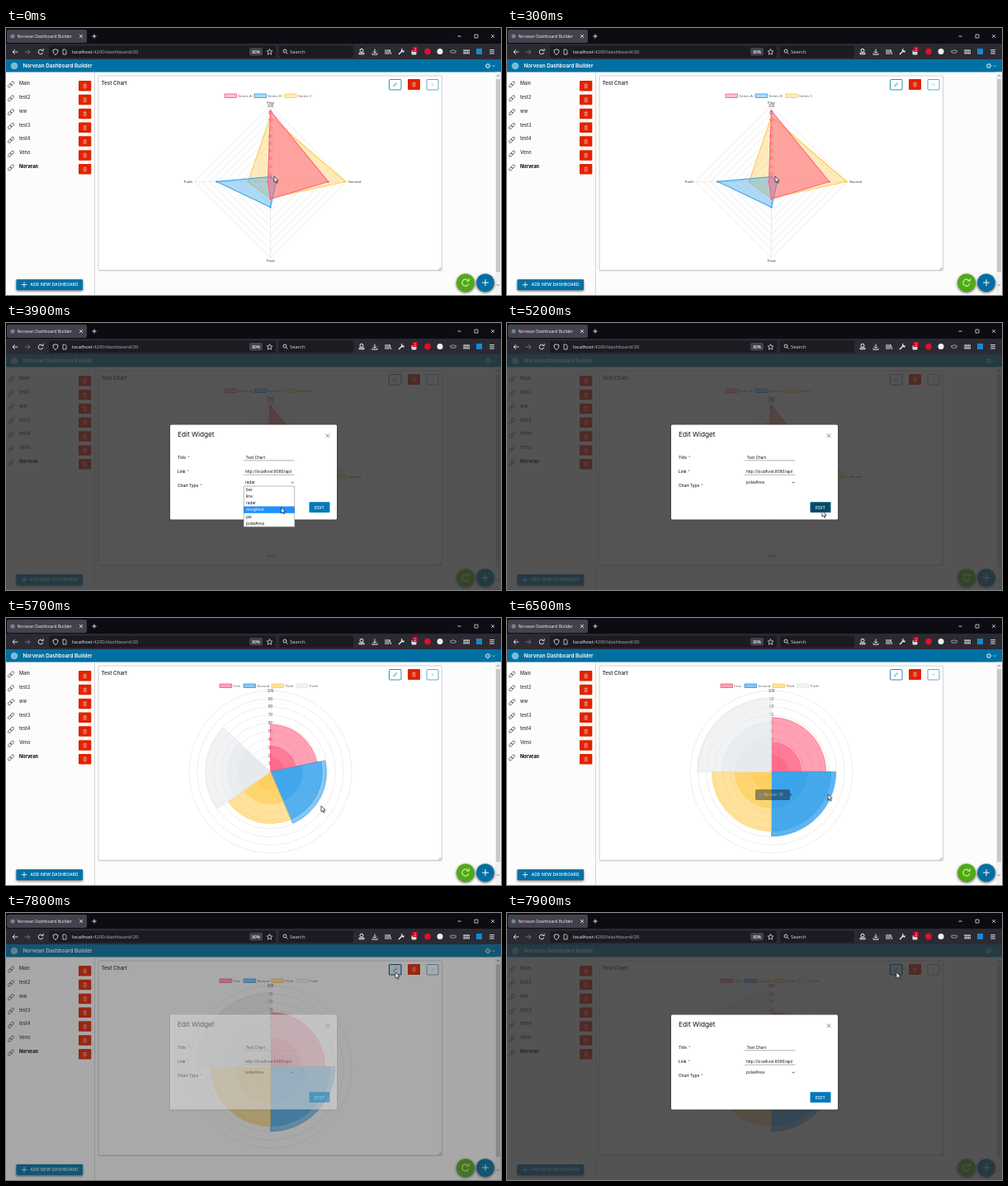
An HTML page with a canvas for the animation above (8000 ms loop, 600 by 324 pixels).

```html
<!DOCTYPE html>
<html lang="en">
<head>
<meta charset="utf-8">
<title>Dashboard</title>
<style>
  html, body { margin: 0; width: 100%; height: 100%; overflow: hidden; background: #fcfcfc; }
  canvas { display: block; width: 600px; height: 324px; }
</style>
</head>
<body>
<canvas id="stage"></canvas>
<script>
const W = 600, H = 324, LOOP = 8000, STEP = 100;
const canvas = document.getElementById('stage');
const ctx = canvas.getContext('2d');
const dpr = window.devicePixelRatio || 1;
canvas.width = W * dpr;
canvas.height = H * dpr;

const BLUE = '#0072a3', RED = '#e12200';
const PALETTE = ['255,99,132', '54,162,235', '255,206,86', '231,233,237'];
const AXES = ['First', 'Second', 'Third', 'Forth'];
const RADAR = [[86, 70, 21, 3], [6, 7, 31, 65], [79, 91, 20, 27]];
const POLAR = [[66, 78, 72, 90], [36, 72, 44, 60], [20, 44, 24, 44]];
const ITEMS = ['Main', 'test2', 'ww', 'test3', 'test4', 'Veno', 'Norvean'];
const CHART_TYPES = ['bar', 'line', 'radar', 'doughnut', 'pie', 'polarArea'];
const CURSOR = [
  [0, 325, 180], [2600, 325, 180], [2700, 316.5, 176], [2900, 336, 194],
  [3500, 336, 194], [4200, 332, 243], [4500, 332, 243], [5100, 382, 228],
  [6400, 382, 228], [6900, 450, 92], [7000, 450, 92], [7600, 472, 72], [8000, 472, 72]
];

const rgba = (i, a) => `rgba(${PALETTE[i]},${a})`;
const clamp = v => Math.max(0, Math.min(1, v));

function rect(x, y, w, h, fill, r = 0) {
  ctx.fillStyle = fill;
  ctx.beginPath();
  ctx.roundRect(x, y, w, h, r);
  ctx.fill();
}
function frame(x, y, w, h, color, width = 0.8, r = 0) {
  ctx.strokeStyle = color;
  ctx.lineWidth = width;
  ctx.beginPath();
  ctx.roundRect(x, y, w, h, r);
  ctx.stroke();
}
function disc(x, y, r, fill) {
  ctx.fillStyle = fill;
  ctx.beginPath();
  ctx.arc(x, y, r, 0, 7);
  ctx.fill();
}
function ring(x, y, r, color, width = 0.8, from = 0, to = Math.PI * 2) {
  ctx.strokeStyle = color;
  ctx.lineWidth = width;
  ctx.beginPath();
  ctx.arc(x, y, r, from, to);
  ctx.stroke();
}
function icon(x, y, path, color, width = 0.9, fill) {
  ctx.save();
  ctx.translate(x, y);
  const shape = new Path2D(path);
  if (fill) { ctx.fillStyle = fill; ctx.fill(shape); }
  ctx.strokeStyle = color;
  ctx.lineWidth = width;
  ctx.stroke(shape);
  ctx.restore();
}
function text(s, x, y, size, color, { weight = 400, align = 'left', family = 'Inter', gap = 0 } = {}) {
  ctx.font = `${weight} ${size}px ${family}, sans-serif`;
  ctx.textAlign = align;
  ctx.letterSpacing = gap + 'px';
  ctx.fillStyle = color;
  ctx.fillText(s, x, y);
}
function withShadow(color, blur, dy, draw) {
  ctx.save();
  ctx.shadowColor = color;
  ctx.shadowBlur = blur * dpr;
  ctx.shadowOffsetY = dy * dpr;
  draw();
  ctx.restore();
}
function clipped(x, y, w, h, draw) {
  ctx.save();
  ctx.beginPath();
  ctx.rect(x, y, w, h);
  ctx.clip();
  draw();
  ctx.restore();
}

const CROSS = 'M-2-2L2 2M2-2L-2 2';
const PLUS = 'M-2.5 0H2.5M0-2.5V2.5';
const CARET = 'M-1.5-.7L0 .8L1.5-.7';

function drawBrowser() {
  const ui = { family: 'Open Sans' }, light = '#f4f4f6';
  rect(0, 0, W, 20, '#0d0c12');
  rect(1, 2, 97, 16, '#42414d', 2);
  disc(8, 10, 2.6, '#6d8796');
  clipped(13, 3, 70, 14, () => text('Norvean Dashboard Builder', 13.5, 12, 5.1, light, ui));
  icon(91, 10, CROSS, light, 0.8);
  icon(107, 10, PLUS, light, 0.9);
  icon(549.5, 10, 'M-2 0H2', light, 0.8);
  frame(568, 8, 4, 4, light, 0.7);
  icon(590, 10, CROSS, light, 0.7);

  rect(0, 19, W, 19, '#2b2a33');
  icon(11, 29, 'M3.3 0H-3M-.2-2.8L-3 0L-.2 2.8', light, 0.9);
  icon(26, 29, 'M-3.3 0H3M.2-2.8L3 0L.2 2.8', '#7c7b83', 0.9);
  ring(42, 29, 2.8, light, 0.9, 0.2, 5.4);
  icon(44, 26.5, 'M1.2-1.5V1H-1.3', light, 0.8);
  rect(52, 21.5, 275, 14.5, '#1c1b22', 2);
  icon(60, 29, 'M0-3.3L3-2.1C3 1 1.6 2.6 0 3.5C-1.6 2.6-3 1-3-2.1Z', light, 0.8);
  icon(71, 29, 'M-2-3H.8L2-1.7V3H-2Z', light, 0.7);
  text('localhost', 80, 31.2, 5.9, '#fbfbfe', ui);
  const hostWidth = ctx.measureText('localhost').width;
  text(':4200/dashboard/20', 80 + hostWidth, 31.2, 5.9, '#b4b3ba', ui);
  rect(295, 24, 16, 9.5, '#42414d', 2);
  text('80%', 303, 30.8, 4.8, light, { ...ui, align: 'center', weight: 600 });
  icon(319.5, 29, 'M0-3.5L1-1.1L3.4-1L1.6.7L2.2 3.2L0 1.8L-2.2 3.2L-1.6.7L-3.4-1L-1-1.1Z', light, 0.7);
  rect(331, 21.5, 90, 14.5, '#1c1b22', 2);
  ring(338, 28, 2, light, 0.8);
  icon(339.5, 29.5, 'M0 0L2 2', light, 0.8);
  text('Search', 344, 31.2, 5.9, '#d9d9de', ui);

  ring(431, 27.3, 2, light, 1);
  icon(431, 30.5, 'M-3 1.3V-.3H3V1.3Z', light, 0.9);
  icon(447, 29, 'M0-3.5V1.5M-2-.5L0 1.6L2-.5M-3 1.5V3.2H3V1.5', light, 0.9);
  icon(463, 29, 'M-3-3V3M-1-3V3M1-3V3M1.8-3L3.8 3', light, 0.9);
  icon(479, 29, 'M-3 3L1-1M0-2.5L2.5 0L3.5-1.5M0-2.5L1.5-3.5', light, 1.3);
  rect(491.5, 27, 6, 5.5, '#d9d9de', 1);
  rect(492.5, 22.8, 6.5, 6.2, '#d70022', 1);
  text('2', 495.8, 27.5, 4.5, '#fff', { ...ui, align: 'center' });
  disc(511, 28.6, 3.8, '#e40d2c');
  disc(526, 28.6, 3.5, '#f1f1f1');
  icon(542, 28.8, 'M-3.5-1Q0-3 3.5-1Q3 2.5 1 1.3H-1Q-3 2.5-3.5-1Z', '#b4b3ba', 0.8);
  for (let i = 0; i < 8; i++) rect(554.5 + (i % 4) * 2, 26.2 + (i >> 2) * 3, 1.4, 2.2, '#e4e4e8');
  rect(570, 25, 7, 7, '#138bd1');
  icon(589, 28.8, 'M-2.8-2.2H2.8M-2.8 0H2.8M-2.8 2.2H2.8', light, 0.9);
}

function trash(x, y) {
  icon(x, y, 'M-2-1.7H2M-.7-1.7V-2.5H.7V-1.7M-1.5-1.7V2.5H1.5V-1.7M-.5-.4V1.5M.5-.4V1.5', 'rgba(255,255,255,.8)', 0.5);
}
function link(x, y) {
  ctx.save();
  ctx.translate(x, y);
  ctx.rotate(-Math.PI / 4);
  frame(-4.4, -1.5, 4.8, 3, '#555', 0.8, 1.5);
  frame(-0.4, -1.5, 4.8, 3, '#555', 0.8, 1.5);
  ctx.restore();
}

function drawPage(t, cursor) {
  rect(0, 38, W, H - 38, '#fcfcfc');
  rect(0, 38, W, 15.5, '#0070a2');
  disc(10, 46, 4.3, '#7dbad3');
  text('Norvean Dashboard Builder', 20.5, 48.2, 6.3, '#fff', { weight: 600 });
  ring(584, 46, 2, '#d5e9f2', 1);
  ctx.setLineDash([1, 1.05]);
  ring(584, 46, 2.9, '#d5e9f2', 0.9);
  ctx.setLineDash([]);
  icon(591, 46, CARET, '#d5e9f2', 0.8);

  rect(107, 53.5, 0.8, H, '#ccc');
  ITEMS.forEach((name, i) => {
    const y = 67.5 + i * 16.83;
    link(6, y + 1);
    text(name, 16, y + 1.6, 5.5, i === 6 ? '#000' : '#333', { weight: i === 6 ? 700 : 500 });
    rect(88, y - 3.5, 15.3, 12.5, RED, 1);
    trash(95.7, y + 3);
  });
  withShadow('rgba(0,0,0,.6)', 3, 1.2, () => rect(12.5, 305, 80.5, 13, '#0072a8', 1));
  icon(22, 311.5, 'M-3.3 0H3.3M0-3.3V3.3', '#fff', 0.8);
  text('ADD NEW DASHBOARD', 29.5, 313.3, 5, '#fff', { weight: 500, gap: 0.1 });

  withShadow('rgba(0,0,0,.18)', 1, 1, () => rect(112, 58, 416.5, 236, '#fff', 1));
  frame(112, 58, 416.5, 236, '#cacaca', 0.8, 1);
  text('Test Chart', 115.5, 68.6, 6.3, '#222', { weight: 500 });
  const hover = cursor[0] > 464 && cursor[1] > 62 && cursor[1] < 76;
  rect(464.5, 62.5, 14.5, 12.5, hover ? '#e3f1f8' : '#fff', 1);
  frame(464.5, 62.5, 14.5, 12.5, hover ? '#00567a' : BLUE, hover ? 1.2 : 0.8, 1);
  icon(471.7, 68.7, 'M-2 2L-1.6.6L1.3-2.2L2.3-1.2L-.6 1.6Z', BLUE, 0.55);
  rect(487, 62, 15, 13, RED, 1);
  trash(494.5, 68.5);
  frame(510, 62.5, 14, 12.5, '#3c93b8', 0.8, 1);
  icon(517, 68.7, 'M-1.8 0H1.8M0-1.8V1.8', '#a6ccdd', 0.6);
  icon(526, 292, 'M-1.5 1.5L1.5-1.5M0 1.5L1.5 0', '#777', 0.6);

  if (t < 5300) drawRadar();
  else drawPolar(t);

  rect(593, 53.5, 7, H - 53.5, '#f1f1f1');
  rect(594, 62, 5, 234, '#c9c9c9');
  icon(596.5, 58, 'M-1.5.8L0-.8L1.5.8', '#555', 0.8);
  icon(596.5, 312, CARET, '#555', 0.8);
  const fab = (x, fill) => withShadow('rgba(0,0,0,.75)', 3.5, 1.2, () => disc(x, 309, 10.8, fill));
  fab(557, '#50ab12');
  fab(581, '#006fa3');
  ring(557, 309, 4, '#fff', 1, 0.3, 5.4);
  icon(560, 305.5, 'M1.2-1.7V1.5H-2', '#fff', 0.9);
  icon(581, 309, 'M-4 0H4M0-4V4', '#fff', 1);
}

function legend(names, xs) {
  names.forEach((name, i) => {
    rect(xs[i], 80, 14.5, 4.5, rgba(i, names.length === 3 ? 0.4 : 0.6));
    frame(xs[i], 80, 14.5, 4.5, rgba(i, 1), 0.9);
    text(name, xs[i] + 16.3, 83.9, 4.4, '#666', { family: 'Liberation Sans' });
  });
}
function ticks(cx, cy, step) {
  for (let i = 1; i <= 10; i++) {
    const y = cy - i * step;
    rect(cx - 3, y - 2.2, 6, 4.4, 'rgba(255,255,255,.75)');
    text(i * 10, cx, y + 1.5, 4.5, '#444', { align: 'center', family: 'Liberation Sans' });
  }
}

function drawRadar() {
  const cx = 320.5, cy = 186.5, R = 92;
  const trace = values => {
    ctx.beginPath();
    ctx.moveTo(cx, cy - values[0]);
    ctx.lineTo(cx + values[1], cy);
    ctx.lineTo(cx, cy + values[2]);
    ctx.lineTo(cx - values[3], cy);
    ctx.closePath();
  };
  legend(['Series A', 'Series B', 'Series C'], [265, 301, 337.5]);
  ctx.strokeStyle = '#dedede';
  ctx.lineWidth = 0.55;
  for (let i = 1; i <= 10; i++) {
    trace(Array(4).fill(R * i / 10));
    ctx.stroke();
  }
  icon(cx, cy, `M-${R} 0H${R}M0-${R}V${R}`, '#dedede', 0.55);
  const small = (s, x, y, align) => text(s, x, y, 4.4, '#333', { align, family: 'Liberation Sans' });
  ticks(cx, cy, R / 10);
  small(AXES[0], cx, 92, 'center');
  small(AXES[1], cx + R + 2.5, 188, 'left');
  small(AXES[2], cx, 284.3, 'center');
  small(AXES[3], cx - R - 2.5, 188, 'right');
  for (let s = 2; s >= 0; s--) {
    const v = RADAR[s];
    trace(v);
    ctx.fillStyle = rgba(s, s === 0 ? 0.52 : 0.4);
    ctx.fill();
    ctx.strokeStyle = rgba(s, 1);
    ctx.lineWidth = 1.15;
    ctx.stroke();
    [[0, -v[0]], [v[1], 0], [0, v[2]], [-v[3], 0]].forEach(p => disc(cx + p[0], cy + p[1], 1.2, rgba(s, 1)));
  }
}

function drawPolar(t) {
  const cx = 320.5, cy = 186.7, R = 98.5;
  const grow = 1 - Math.pow(1 - clamp((t - 5300) / 1000), 4);
  const sweep = Math.PI / 2 * grow;
  legend(AXES, [259, 288, 322, 351.5]);
  for (let i = 1; i <= 10; i++) ring(cx, cy, R * i / 10, '#dfdfdf', 0.55);
  ticks(cx, cy, R / 10);
  const hovered = t >= 6500 && t < 6700;
  for (let s = 2; s >= 0; s--) {
    POLAR[s].forEach((r, i) => {
      ctx.beginPath();
      ctx.moveTo(cx, cy);
      ctx.arc(cx, cy, r * grow, -Math.PI / 2 + i * sweep, -Math.PI / 2 + (i + 1) * sweep);
      ctx.closePath();
      ctx.fillStyle = rgba(i, hovered && s === 0 && i === 1 ? 0.8 : 0.6);
      ctx.fill();
      ctx.strokeStyle = rgba(i, 1);
      ctx.lineWidth = 0.7;
      ctx.stroke();
    });
  }
  const tip = t < 6500 ? 0 : t < 6700 ? (t - 6400) / 200 : clamp((6900 - t) / 300);
  if (tip > 0) {
    ctx.save();
    ctx.globalAlpha = tip;
    rect(301, 208, 42, 13, 'rgba(0,0,0,.8)', 2);
    icon(343, 214.5, 'M0-2L2.5 0L0 2Z', 'transparent', 0.1, 'rgba(0,0,0,.8)');
    rect(304, 212.3, 4.5, 4.5, rgba(1, 1));
    text('Second: 79', 311, 216.3, 4.6, '#fff', { family: 'Liberation Sans' });
    ctx.restore();
  }
}

function modalAlpha(t) {
  if (t >= 7900) return 1;
  if (t >= 7800) return 0.5;
  if (t < 2700 || t >= 5500) return 0;
  return t >= 5400 ? 0.3 : t >= 5300 ? 0.75 : 1;
}

function drawModal(t, cursor) {
  const alpha = modalAlpha(t);
  if (!alpha) return;
  ctx.save();
  ctx.globalAlpha = alpha;
  rect(0, 38, W, H - 38, 'rgba(46,45,46,.81)');
  withShadow('rgba(0,0,0,.4)', 2, 0.5, () => rect(199, 123.5, 202, 115, '#fff', 1.5));
  text('Edit Widget', 208, 138.2, 8.2, '#111');
  icon(390, 136.7, 'M-2.3-2.3L2.3 2.3M2.3-2.3L-2.3 2.3', '#555', 0.7);
  [['Title', 164.8], ['Link', 181.8], ['Chart Type', 198.6]].forEach(([label, y]) => {
    text(label, 208, y, 4.8, '#222', { weight: 500 });
    text('*', 208 + ctx.measureText(label).width + 2, y + 0.3, 4.8, '#c94a4a');
  });
  text('Test Chart', 290.5, 164.7, 4.8, '#111');
  clipped(288, 174, 61, 10, () => text('http://localhost:8080/api/', 290, 181.6, 4.7, '#111'));
  rect(288, 166.6, 61.5, 0.7, '#9a9a9a');
  rect(288, 183.8, 61.5, 0.7, '#9a9a9a');
  text(t < 4400 ? 'radar' : 'polarArea', 290, 195, 4.8, '#111');
  icon(347.3, 193.5, CARET, '#333', 0.8);

  const active = t >= 5000 && t < 5500;
  rect(367.5, 217.3, 25, 12.7, active ? '#004a6b' : '#0079b8', 1);
  if (active) {
    ctx.setLineDash([0.8, 0.8]);
    frame(368.3, 218.1, 23.4, 11.1, '#5d8da3', 0.5);
    ctx.setLineDash([]);
  }
  text('EDIT', 380, 225.5, 5, '#fff', { weight: 500, align: 'center', gap: 0.2 });

  if (t >= 3200 && t < 4400) drawOptions(cursor);
  ctx.restore();
}

function drawOptions(cursor) {
  const top = 198, row = 8.2;
  const current = cursor[1] < top ? 2 : Math.min(5, Math.floor((cursor[1] - top) / row));
  rect(288, top, 62, row * 6, '#fff');
  CHART_TYPES.forEach((name, i) => {
    const y = top + i * row;
    if (i === current) rect(288, y, 62, row, '#1e90ff');
    text(name, 291, y + 5.8, 4.8, i === current ? '#fff' : '#111');
  });
  frame(288.3, top, 61.4, row * 6, '#8a8a8a', 0.6);
}

function cursorAt(t) {
  const i = CURSOR.findIndex(k => k[0] > t);
  const a = CURSOR[i - 1], b = CURSOR[i];
  const p = (t - a[0]) / (b[0] - a[0]);
  const e = p * p * (3 - 2 * p);
  return [a[1] + (b[1] - a[1]) * e, a[2] + (b[2] - a[2]) * e];
}

function render(now) {
  const t = Math.floor(now % LOOP / STEP) * STEP;
  const cursor = cursorAt(t);
  ctx.setTransform(dpr, 0, 0, dpr, 0, 0);
  drawPage(t, cursor);
  drawBrowser();
  drawModal(t, cursor);
  icon(cursor[0], cursor[1], 'M0 0V7.2L1.7 5.7L2.9 8.3L4.1 7.8L2.9 5.2H5.2Z', '#111', 0.7, '#fff');
}

let start;
function tick(now) {
  start ??= now;
  render(now - start);
  requestAnimationFrame(tick);
}
render(0);
requestAnimationFrame(tick);
</script>
</body>
</html>
```
